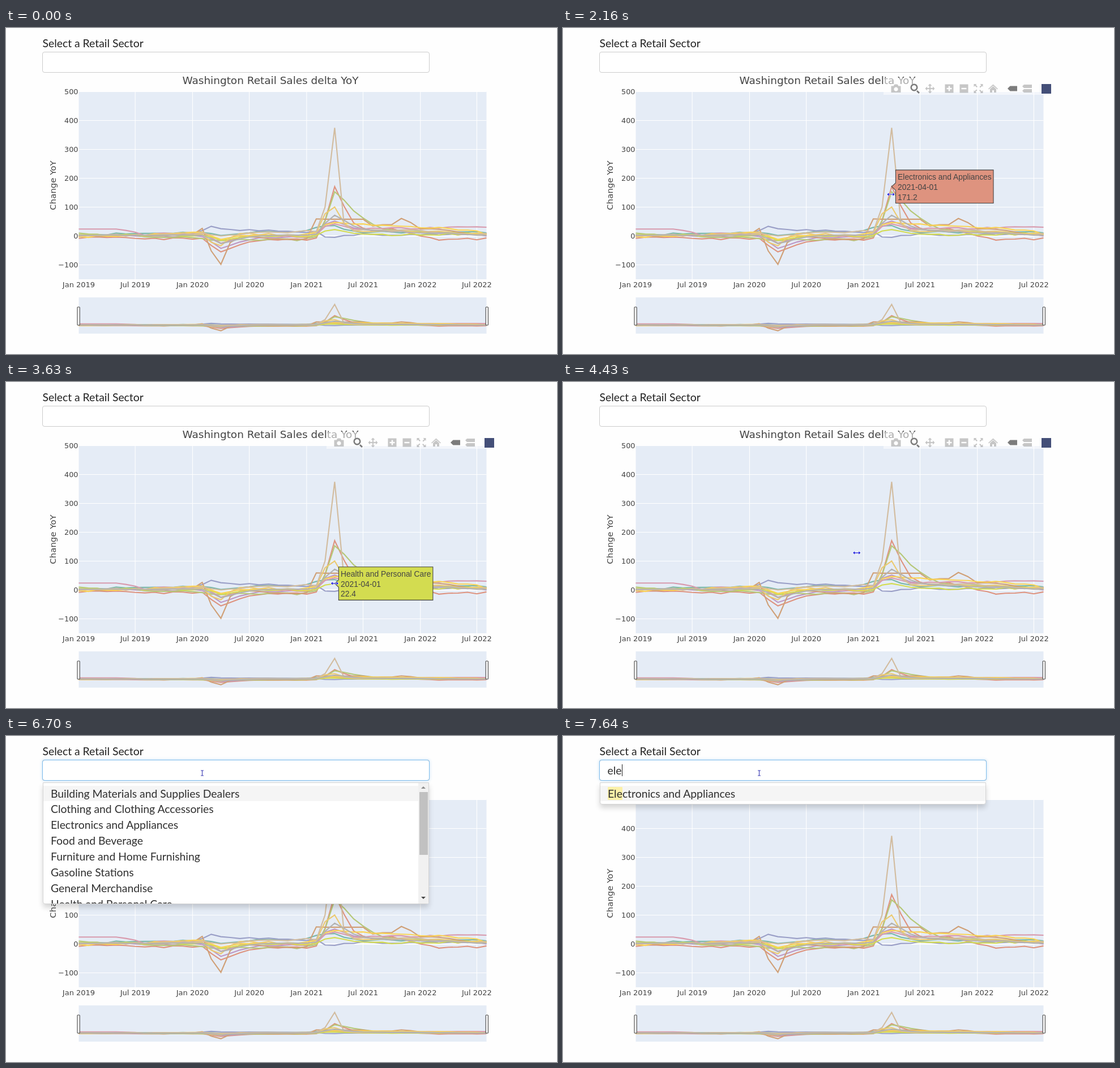
Animation, 973 px wide and 576 px high, one loop 8000 ms. Source, as an HTML page:

```html
<!DOCTYPE html>
<html lang="en">
<head>
<meta charset="utf-8">
<title>Retail sales chart</title>
<style>
html, body { margin: 0; width: 100%; height: 100%; overflow: hidden; background: #fefefe; }
#stage { position: relative; width: 973px; height: 576px; overflow: hidden; font: 19.35px/27.9px Lato, sans-serif; color: #303030; }
#stage > * { position: absolute; box-sizing: border-box; }
svg { left: 0; top: 0; }
svg text { fill: #444; font-family: "DejaVu Sans", sans-serif; }
#tip text { font: 13.87px "Liberation Sans", Arial, sans-serif; }
#label { left: 64.5px; top: 13.4px; color: #222; }
#field, #glow { left: 64px; top: 42px; width: 683.5px; height: 37px; border: 1px solid #ccc; border-radius: 4px; }
#field { background: #fff; }
#glow { border-color: #7fbdec; box-shadow: 0 0 5px rgba(102,175,233,.4); }
#typed { left: 78.5px; top: 46.8px; white-space: pre; }
#caret { top: 50px; width: 1px; height: 21px; background: #222; }
#menu { left: 64.5px; top: 81.5px; width: 682.5px; overflow: hidden; padding-top: 5px; background: #fff; border: 1px solid #d4d4d4; border-radius: 0 0 4px 4px; box-shadow: 0 6px 10px rgba(0,0,0,.16); }
#menu .row { height: 27.9px; padding-left: 13.5px; white-space: pre; }
#menu .row:first-child { background: #f5f5f5; }
#menu mark { color: inherit; background: #fbf0a8; border-radius: 1px; }
#bar { left: 728px; top: 82.5px; width: 18px; height: 213.5px; background: #f1f1f1; }
#bar i { position: absolute; left: 2px; top: 16.5px; width: 15px; height: 111px; background: #c1c1c1; }
#bar b { position: absolute; left: 5px; border: 4px solid transparent; }
#bar .up { top: 2.5px; border-bottom-color: #8c8c8c; }
#bar .down { bottom: 8px; border-top-color: #444; border-bottom-width: 0; }
</style>
</head>
<body>
<div id="stage">
  <svg id="chart" width="973" height="576"></svg>
  <div id="label">Select a Retail Sector</div>
  <div id="field"></div>
  <div id="glow"></div>
  <div id="typed"></div>
  <div id="caret"></div>
  <div id="menu"></div>
  <div id="bar"><b class="up"></b><i></i><b class="down"></b></div>
  <svg id="pointer" width="973" height="576"></svg>
</div>
<script>
const $ = id => document.getElementById(id);
const chart = $('chart');

function el(tag, attrs, parent = chart, text) {
  const node = document.createElementNS('http://www.w3.org/2000/svg', tag);
  for (const k in attrs) node.setAttribute(k, attrs[k]);
  if (text !== undefined) node.textContent = text;
  return parent.appendChild(node);
}

// Scales
const LOOP = 8000, MONTHS = 44, DIP = 15, PEAK = 27;
const monthX = i => 128.5 + (Date.UTC(2019, i, 1) - Date.UTC(2019, 0, 1)) / 864e5 * 720 / 1308;
const valueY = v => 367.5 - v * 0.51;
const miniY = v => 525.2 - v * 0.0985;

// Plot areas, grid and axes
el('rect', { x: 128.5, y: 112, width: 720, height: 332, fill: '#e5ecf6' });
el('rect', { x: 128.5, y: 476, width: 720, height: 64, fill: '#e5ecf6' });
for (let i = 0; i < MONTHS; i += 6) {
  const x = monthX(i);
  if (i) el('path', { d: `M${x} 112V444`, stroke: '#fff', 'stroke-width': 1.1 });
  el('text', { x, y: 458, 'text-anchor': 'middle', 'font-size': 13 }, chart,
    (i % 12 ? 'Jul ' : 'Jan ') + (2019 + Math.floor(i / 12)));
}
for (let v = -100; v <= 500; v += 100) {
  const y = valueY(v);
  el('path', { d: `M128.5 ${y}H848.5`, stroke: '#fff', 'stroke-width': v ? 1.1 : 2.13 });
  el('text', { x: 127.5, y: y + 4.7, 'text-anchor': 'end', 'font-size': 12.8 }, chart, String(v).replace('-', '\u2212'));
}
el('text', { x: 467, y: 99.3, 'text-anchor': 'middle', 'font-size': 18.45 }, chart, 'Washington Retail Sales delta YoY');
el('text', { transform: 'translate(87.5 278) rotate(-90)', 'text-anchor': 'middle', 'font-size': 14.93 }, chart, 'Change YoY');

// Each line is a level through a few [month, value] points with a wobble,
// pulled towards one value in April 2020 (dip) and another in April 2021 (peak).
let seed = 11;
const rand = () => (seed = seed * 16807 % 2147483647) / 2147483647;
const mix = (a, b, p) => a + (b - a) * p;
const pulse = (d, rise, fade) => d < 0 ? rise ** ((-d) ** 3) : fade ** (d ** 1.5);

function level(points, i) {
  const n = Math.max(1, points.findIndex(p => p[0] >= i));
  const [m0, v0] = points[n - 1], [m1, v1] = points[n];
  const wobble = v0 === v1 ? 0 : (rand() - .5) * 7;
  return mix(v0, v1, (i - m0) / (m1 - m0)) + wobble;
}

function line(color, points, { dip, sink = .45, heal = .75, peak, rise = .75, fade = .7 } = {}) {
  const data = Array.from({ length: MONTHS }, (_, i) => {
    let v = level(points, i);
    if (dip !== undefined) v = mix(v, dip, pulse(i - DIP, sink, heal));
    if (peak !== undefined) v = mix(v, peak, pulse(i - PEAK, rise, fade));
    return v;
  });
  for (const y of [valueY, miniY]) {
    el('polyline', {
      points: data.map((v, i) => monthX(i).toFixed(1) + ',' + y(v).toFixed(1)).join(' '),
      fill: 'none', stroke: color, 'stroke-width': 2.13
    });
  }
}

const C = { salmon: '#de937f', green: '#b6c878', gold: '#ecca70', yellow: '#fad456',
  purple: '#bd96c3', tan: '#d2bc9f', lime: '#d3dc50' };

line('#7ab8ab', [[0, 5], [18, 16], [43, 12]], { dip: 2, peak: 36, rise: .95, fade: .4 });
line(C.salmon, [[0, -6], [24, -14], [30, 14], [33, 25], [38, -12], [43, -10]], { dip: -55, peak: 171.2, rise: .33, fade: .6 });
line('#9a9fc7', [[0, 0], [12, 6], [14, 36], [15, 22], [25, 14], [26, -6], [30, 6], [43, 4]]);
line(C.purple, [[0, 2], [24, -4], [30, 20], [43, 3]], { dip: -43, peak: 51.5 });
line(C.green, [[0, 8], [14, -10], [23, -13], [30, 18], [43, 8]], { dip: -16, peak: 153.4, rise: .33, fade: .8 });
line('#d89aad', [[0, 24], [4, 24], [7, 5], [13, 14], [24, -6], [30, 22], [37, 30], [43, 32]], { dip: -25, peak: 42 });
line('#d0a077', [[0, 0], [12, 5], [13, 30], [15, 0], [24, -12], [25, 58], [30, 58], [31, 38], [33, 40], [34, 60], [36, 27], [43, 4]],
  { dip: -98, sink: .6, heal: .2 });
line(C.lime, [[0, 3], [24, 0], [43, 8]], { dip: -15, sink: .1, peak: 22.4 });
line(C.yellow, [[0, -3], [13, 12], [24, 4], [30, 32], [37, 28], [41, 22], [43, 8]], { dip: -12, peak: 46.8, fade: .9 });
line(C.gold, [[0, -3], [13, 10], [24, 3], [34, 18], [43, 8]], { dip: -34, sink: .7, heal: .3, peak: 100.3, fade: .4 });
line(C.tan, [[0, 0], [13, 8], [24, 16], [34, 20], [43, 6]], { dip: 0, peak: 375, rise: .23, fade: .06 });
line('#b3b2b0', [[0, 3], [24, 3], [30, 18], [43, 3]], { dip: -26, peak: 72, rise: .55 });

// Range handles
for (const x of [126, 847.2]) {
  el('rect', { x, y: 493, width: 4.2, height: 32, rx: 1, fill: '#fff', stroke: '#444', 'stroke-width': 1.1 });
}

// Tool bar
const tools = el('g', {});
el('rect', { x: 566, y: 88, width: 296, height: 30, fill: '#fff', 'fill-opacity': .55 }, tools);

function icon(x, d, { dark, turns = 1 } = {}) {
  const g = el('g', { transform: `translate(${x} 107)`, fill: '#444', opacity: dark ? .7 : .3 }, tools);
  for (let i = 0; i < turns; i++) {
    el('path', { d, transform: `rotate(${i * 360 / turns})`, 'fill-rule': 'evenodd' }, g);
  }
}
const square = 'M-7.5-7.5h15v15h-15z';
icon(588, 'M-8.5-4.5h4l2-3h5l2 3h4v11.5h-17zM0-2.5a3.6 3.6 0 1 0 .01 0z');
icon(621, 'M-1-8.5a6.5 6.5 0 1 0 .01 0zM-1-6a4 4 0 1 1-.01 0zM3 5l2-2 4 4-2 2z', { dark: true });
icon(648, 'M-1 0v-5h-2.5L0-8.5l3.5 3.5H1v5z', { turns: 4 });
icon(682, square + 'M-1.3-4.5h2.6v3.2h3.2v2.6h-3.2v3.2h-2.6v-3.2h-3.2v-2.6h3.2z');
icon(708, square + 'M-4.5-1.3h9v2.6h-9z');
icon(733.5, 'M-8-8h5l-1.5 1.5 3 3-1.5 1.5-3-3L-8-3z', { turns: 4 });
icon(759.5, 'M-8.5.5L0-7.5 8.5.5l-1 1L0-5l-7.5 6.5zM-5.5 1L0-4 5.5 1v6h-4v-4h-3v4h-4z');
icon(794, 'M-9 0l4.5-4.5h12.5v9h-12.5z', { dark: true });
icon(820, 'M-9-4l3-3h14v6h-14zM-9 4l3-3h14v6h-14z');
el('rect', { x: 845, y: 99, width: 17, height: 17, fill: '#444f78' }, tools);

// Hover label
const tip = el('g', { id: 'tip' });
const tipBox = el('path', { stroke: '#444', 'stroke-width': 1.07 }, tip);
const tipRows = [0, 1, 2].map(i => el('text', { x: 10.7, y: i * 18 - 12.6 }, tip));

const hovers = [
  [960, 'Sporting Goods and Hobby', 375, C.tan],
  [2030, 'Electronics and Appliances', 171.2, C.salmon],
  [2230, 'Motor Vehicles and Parts', 153.4, C.green],
  [2760, 'Clothing and Clothing Accessories', 100.3, C.gold],
  [2970, 'Furniture and Home Furnishing', 51.5, C.purple],
  [3500, 'Building Materials and Supplies Dealers', 46.8, C.yellow],
  [3630, 'Health and Personal Care', 22.4, C.lime],
  [4150]
];
let shown;

function drawTip(t) {
  const now = hovers.filter(h => h[0] <= t).pop();
  if (now === shown) return;
  shown = now;
  const live = now && now[1];
  tip.style.display = live ? '' : 'none';
  if (!live) return;
  const [, name, value, color] = now;
  [name, '2021-04-01', value].forEach((s, i) => tipRows[i].textContent = s);
  const w = Math.max(...tipRows.map(r => r.getComputedTextLength())) + 7;
  tip.setAttribute('transform', `translate(${monthX(PEAK).toFixed(1)} ${valueY(value).toFixed(1)})`);
  tipBox.setAttribute('d', `M0 0L7-6.5V-29.3h${w}V29.3h${-w}V6.5z`);
  tipBox.setAttribute('fill', color);
}

// Mouse pointer shapes
const pointer = $('pointer');
const shapes = {};
for (const k of ['resize', 'arrow', 'beam']) shapes[k] = el('g', { fill: 'none' }, pointer);
const resize = 'M-5 0H5M-3.5-2L-5.7 0l2.2 2M3.5-2L5.7 0 3.5 2';
el('path', { d: resize, stroke: '#fff', 'stroke-width': 2.6 }, shapes.resize);
el('path', { d: resize, stroke: '#1414dc', 'stroke-width': 1.2 }, shapes.resize);
el('path', { d: 'M0 0v11l2.6-2.4 1.7 3.9 1.6-.7-1.7-3.8h3.5z', fill: '#fff', stroke: '#222', 'stroke-width': .9 }, shapes.arrow);
el('path', { d: 'M-2.5-4.5h5M0-4.5v9M-2.5 4.5h5', stroke: '#3c3cb4', 'stroke-width': 1.1 }, shapes.beam);

// Moves: start, end, x, y, easing; the pointer rests in between
const smooth = p => p * p * (3 - 2 * p), speedUp = p => p * p, slowDown = p => p * (2 - p);
const moves = [
  [500, 1180, 573, 189.5, slowDown],
  [1770, 2160, 579, 294, smooth],
  [2690, 3040, 582, 342, smooth],
  [3500, 3690, 580, 360, smooth],
  [4020, 4430, 519.5, 303, speedUp],
  [4430, 4760, 392, 114, slowDown],
  [4830, 5310, 346.5, 65.5, smooth]
];
const clamp = p => Math.max(0, Math.min(1, p));

function drawPointer(t) {
  pointer.style.display = t < 500 ? 'none' : '';
  let x = 439, y = 113;
  for (const [t0, t1, toX, toY, ease] of moves) {
    const p = ease(clamp((t - t0) / (t1 - t0)));
    x = mix(x, toX, p);
    y = mix(y, toY, p);
  }
  const kind = y > 112 ? 'resize' : y > 78 ? 'arrow' : 'beam';
  for (const k in shapes) shapes[k].style.display = k === kind ? '' : 'none';
  shapes[kind].setAttribute('transform', `translate(${x.toFixed(2)} ${y.toFixed(2)})`);
}

// Sector field and its list
const sectors = ['Building Materials and Supplies Dealers', 'Clothing and Clothing Accessories',
  'Electronics and Appliances', 'Food and Beverage', 'Furniture and Home Furnishing',
  'Gasoline Stations', 'General Merchandise', 'Health and Personal Care',
  'Miscellaneous Retailers', 'Motor Vehicles and Parts', 'Sporting Goods and Hobby'];
const OPEN = 5560, TYPE = 7370, KEY = 135;
let query;

function fillMenu(q) {
  const first = s => s.toLowerCase().startsWith(q) ? 0 : 1;
  const hits = sectors.filter(s => s.toLowerCase().includes(q));
  if (q) hits.sort((a, b) => first(a) - first(b) || a.length - b.length);
  const mark = s => q ? s.replace(new RegExp(q, 'gi'), '<mark>$&</mark>') : s;
  $('menu').innerHTML = hits.map(s => `<div class="row">${mark(s)}</div>`).join('');
  $('menu').style.height = Math.min(215.5, hits.length * 27.9 + 12) + 'px';
  $('bar').style.visibility = hits.length > 7 ? 'inherit' : 'hidden';
  $('typed').textContent = q;
  $('caret').style.left = 79 + $('typed').getBoundingClientRect().width + 'px';
}

function drawField(t) {
  const open = t >= OPEN;
  for (const id of ['menu', 'bar', 'typed']) $(id).style.display = open ? '' : 'none';
  $('glow').style.opacity = clamp((t - OPEN + 40) / 220);
  const blink = t >= TYPE || Math.floor((t - OPEN - 60) / 560) % 2 < 1;
  $('caret').style.display = open && blink ? '' : 'none';
  const q = 'ele'.slice(0, Math.max(0, Math.floor((t - TYPE) / KEY) + 1));
  if (open && q !== query) fillMenu(query = q);
}

function draw() {
  const t = performance.now() % LOOP;
  tools.style.opacity = Math.min(clamp((t - 500) / 300), clamp((5250 - t) / 300));
  drawTip(t);
  drawPointer(t);
  drawField(t);
  requestAnimationFrame(draw);
}
tip.style.display = 'none';
draw();
</script>
</body>
</html>
```
